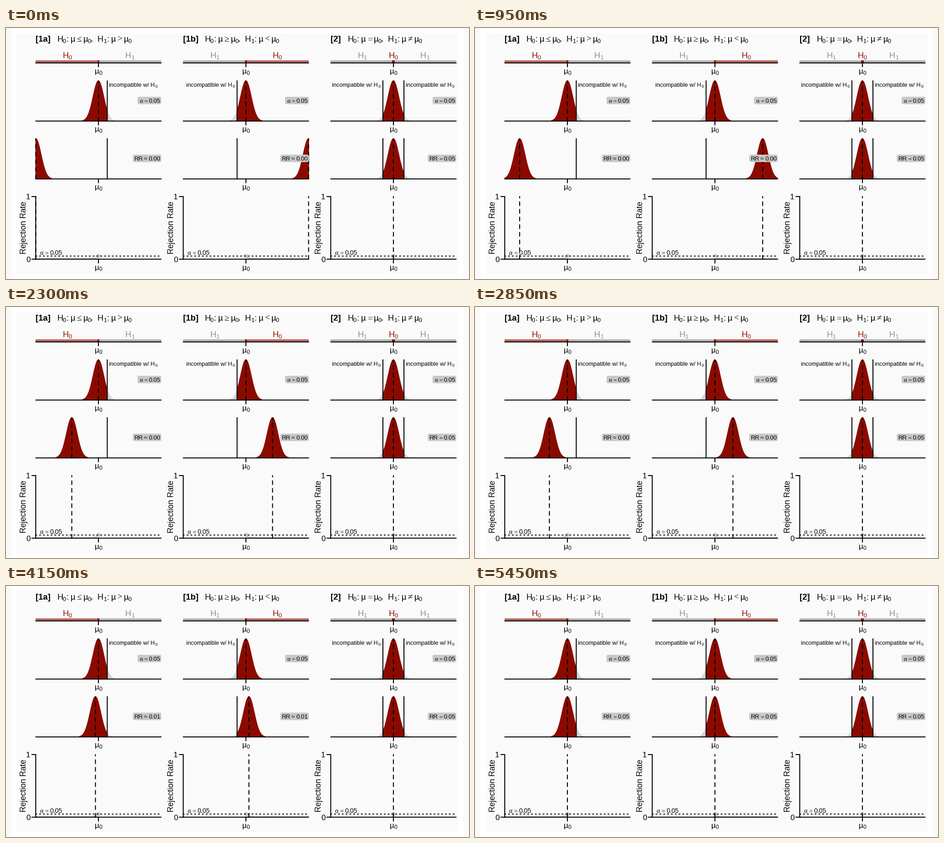
Recreate the animation shown at these times as a matplotlib script. Size 1017x551 px, loop 6.5 s.

```python
import math

import matplotlib.pyplot as plt
import numpy as np
from matplotlib.animation import FuncAnimation
from matplotlib.patches import Circle, FancyBboxPatch, Polygon, Rectangle

W, H, DPI = 1017, 551, 128
PX = 72 / DPI                      # points per pixel
SANS, SERIF = "Liberation Sans", "Liberation Serif"

PAPER, RED, RED_BAND = "#fafafa", "#8b0a00", "#bc6660"
BAND, TAIL, CURVE, BADGE, GREY = "#b2b2b2", "#d3d3d3", "#c6c6c6", "#c8c8c8", "#8c8c8c"

STEP = 324                         # distance between panels
LEFT, MID, RIGHT = 65.3, 203, 340.8
HALF = 137.6
SD, PEAK = 11.8, 88.5
ROW1, ROW2, ROW3, ROW4 = 76.7, 204.3, 331.3, 507.5
UNIT = 137.5                       # height of a rejection rate of 1
Z1, Z2 = 1.645, 1.96
LW, EDGE = 2.1, 1.5

MS, FRAMES = 50, 130
COARSE, LAST = 75, 109

fig = plt.figure(figsize=(W / DPI, H / DPI), dpi=DPI, facecolor="white")
ax = fig.add_axes([0, 0, 1, 1])
ax.set_xlim(0, W)
ax.set_ylim(H, 0)
ax.axis("off")


def put(x, y, s, size, color="black", font=SANS, z=5, **kw):
    return ax.text(x, y, s, fontsize=size * PX, color=color, family=font,
                   va="baseline", zorder=z, **kw)


def with_sub(x, y, s, sub, size, advance, color="black"):
    put(x, y, s, size, color)
    put(x + advance * size, y + 0.17 * size, sub, 0.7 * size, color)


def line(xs, ys, lw=LW, color="black", z=4, **kw):
    return ax.plot(xs, ys, color=color, lw=lw * PX, zorder=z, snap=False,
                   solid_capstyle="round", dash_capstyle="round", **kw)[0]


def dashed(x, y, height):
    return line([x, x], [y, y - height], ls=(0, (4, 4)))


def box(x0, y0, x1, y1, color, z=2):
    ax.add_patch(Rectangle((x0, y0), x1 - x0, y1 - y0, color=color, lw=0, zorder=z))


def badge(x0, y0, x1, y1):
    r = 3.5
    ax.add_patch(FancyBboxPatch((x0 + r, y0 + r), x1 - x0 - 2 * r, y1 - y0 - 2 * r,
                                boxstyle=f"round,pad={r}", fc=BADGE, lw=0, zorder=4.5))


def upper_tail(z):
    return 0.5 * math.erfc(z / math.sqrt(2))


def bell_part(c, lo, hi, base):
    x = np.linspace(lo, hi, 120)
    y = base - PEAK * np.exp(-0.5 * ((x - c) / SD) ** 2)
    return np.column_stack([np.r_[lo, x, hi], np.r_[base, y, base]])


class Bell:
    """Density around a mean, red inside the cutoffs and grey beyond them."""

    def __init__(self, x0, base, cuts):
        self.x0, self.base = x0, base
        self.cuts = [MID + x0 + z * SD for z in cuts]
        self.parts = [ax.add_patch(Polygon([[0, 0]] * 3, fc=c, ec=c, lw=EDGE * PX,
                                           joinstyle="round", zorder=3))
                      for c in (TAIL, RED, TAIL)]
        self.axis = dashed(0, base, PEAK)
        for x in self.cuts:
            if abs(x - MID - x0) < 3 * SD:
                line([x, x], [base, base - PEAK])

    def move(self, c):
        lo = max(c - 3 * SD, LEFT + self.x0)
        hi = min(c + 3 * SD, RIGHT + self.x0)
        a, b = (min(max(x, lo), hi) for x in self.cuts)
        for part, (p, q) in zip(self.parts, ((lo, a), (a, b), (b, hi))):
            part.set_visible(q > p)
            part.set_xy(bell_part(c, p, q, self.base))
        self.axis.set_xdata([c, c])


def x_axis(x0, y):
    line([LEFT + x0, RIGHT + x0], [y, y])
    line([MID + x0] * 2, [y, y + 8.5])
    with_sub(MID + x0 - 8.2, y + 23, "\u00b5", "0", 17, 0.576)


def title(x0, tag, shift, signs):
    y, size = 30, 18
    put(x0 + 65.3, y, tag, 18.5, weight="bold")
    x0 += shift
    for x, sub, sign in ((112, "0", signs[0]), (201, "1", signs[1])):
        with_sub(x0 + x, y, "H", sub, size, 0.722)
        put(x0 + x + 20.3, y, ":", size)
        put(x0 + x + 30, y, "\u00b5", size)
        put(x0 + x + 43.7, y, sign, 19, font=SERIF)
        with_sub(x0 + x + 57.3, y, "\u00b5", "0", size, 0.576)
    put(x0 + 185.5, y, ",", size)


def band(x0, kind):
    y0, y1 = 70.7, 76.5
    l, m, r = LEFT + x0, MID + x0, RIGHT + x0
    left, right = {"le": ("0", "1"), "ge": ("1", "0"), "eq": ("1", "1")}[kind]
    for a, b, h in ((l, m, left), (m, r, right)):
        box(a, y0, b, y1, RED_BAND if h == "0" else BAND)
        with_sub((a + b) / 2 - 10, 66, "H", h, 18, 0.722, RED if h == "0" else GREY)
    half = 3.2 if kind == "eq" else 2
    box(m - half, y0, m + half, y1, RED, 3)
    if kind == "eq":
        with_sub(m - 10, 66, "H", "0", 18, 0.722, RED)


def rate_plot(x0, kind):
    l, m, r = LEFT + x0, MID + x0, RIGHT + x0
    line([l, l], [ROW4, ROW4 - UNIT])
    for value in (0, 1):
        y = ROW4 - value * UNIT
        line([l - 8.5, l], [y, y])
        put(x0 + 44.2, y + 6.3, str(value), 17)
    put(x0 + 44.4, 437.8, "Rejection Rate", 17.6, rotation=90,
        rotation_mode="anchor", ha="center")
    level = ROW4 - 0.05 * UNIT
    line([l, r], [level, level], ls=(0, (1, 3)))
    put(x0 + 74.5, 498.5, "\u03b1", 14, font=SERIF)
    put(x0 + 85, 498.5, "=", 14, font=SERIF)
    put(x0 + 96.2, 498.5, "0.05", 14)

    ax.add_patch(Circle((m, level), 4.7, fc=CURVE, lw=0, zorder=3))
    if kind != "eq":
        d = np.linspace(0, HALF, 80)
        y = [ROW4 - UNIT * upper_tail(Z1 + v / SD) for v in d]
        curve = line(m - d if kind == "le" else m + d, y, 4.2, CURVE, 2)
        curve.set_clip_path(Rectangle((l, 360), r - l, ROW4 - 360,
                                      transform=ax.transData))


class Panel:
    def __init__(self, index, kind, tag, shift, signs, cuts, notes):
        x0 = index * STEP
        self.x0 = x0
        self.side = {"le": -1, "ge": 1, "eq": 0}[kind]
        title(x0, tag, shift, signs)
        band(x0, kind)
        for y in (ROW1, ROW2, ROW3, ROW4):
            x_axis(x0, y)
        for x in notes:
            with_sub(x0 + x, 129, "incompatible w/ H", "0", 12.8, 7.89)

        Bell(x0, ROW2, cuts).move(MID + x0)
        badge(x0 + 289, 151, x0 + 341, 167.3)
        put(x0 + 293, 164, "\u03b1", 13.3, font=SERIF)
        put(x0 + 303, 164, "=", 13.3, font=SERIF)
        put(x0 + 313.8, 164, "0.05", 13.3)

        self.bell = Bell(x0, ROW3, cuts)
        badge(x0 + 278.5, 278, x0 + 341, 294.3)
        put(x0 + 282, 291, "RR", 13.3)
        self.sign = put(x0 + 303, 291, "=", 13.3, font=SERIF)
        self.rate = put(x0 + 313.8, 291, "0.05", 13.3)

        rate_plot(x0, kind)
        self.marker = dashed(MID + x0, ROW4, UNIT)

    def move(self, d):
        c = MID + self.x0 + self.side * d
        self.bell.move(c)
        self.marker.set_xdata([c, c])
        if self.side:
            self.sign.set_text("\u2248" if d > 0 else "=")
            self.rate.set_text(f"{upper_tail(Z1 + d / SD):.2f}")


def distance(i):
    """Gap between true mean and mu0: even steps, then finer ones near zero."""
    i = min(i, LAST)
    if i <= COARSE:
        return HALF * (1 - i / 80)
    return HALF * (1 - COARSE / 80) * (LAST - i) / (LAST - COARSE)


box(0, 0, 12, H, "#f9f9f9", 0)
box(1005, 0, W, H, "#f9f9f9", 0)
box(23, 11, 994, 540, PAPER, 0)

FAR = 99
panels = [
    Panel(0, "le", "[1a]", 0, "\u2264>", (-FAR, Z1), [226.5]),
    Panel(1, "ge", "[1b]", 0, "\u2265<", (-Z1, FAR), [72.5]),
    Panel(2, "eq", "[2]", -10, "=\u2260", (-Z2, Z2), [68.5, 230.5]),
]


def draw(i):
    for p in panels:
        p.move(distance(i))
    return []


anim = FuncAnimation(fig, draw, frames=FRAMES, interval=MS, repeat=True,
                     repeat_delay=0, init_func=lambda: draw(0), blit=False)
plt.show()
```
